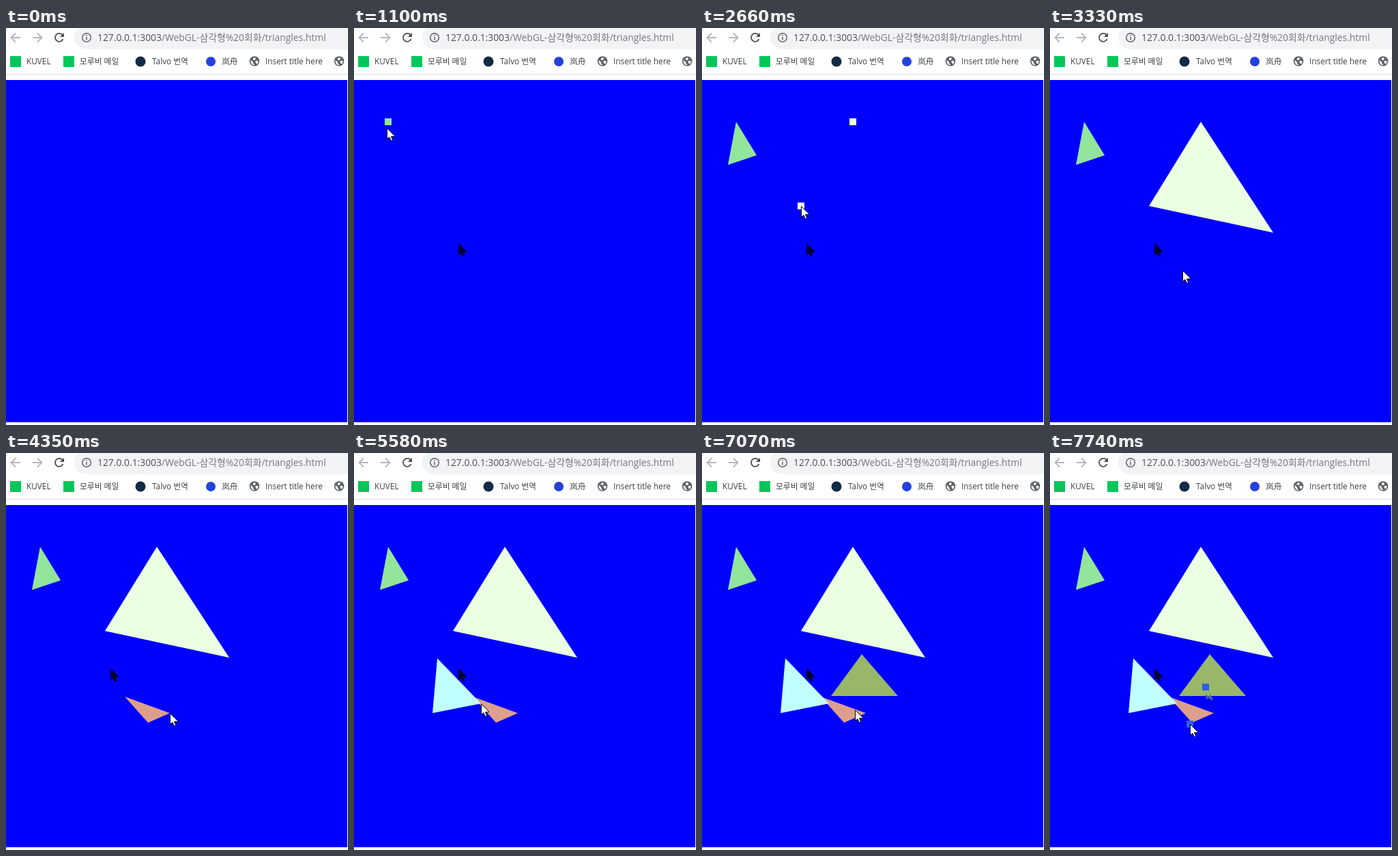
Recreate the animation shown at these times as an HTML page. Size 501 by 580 pixels, loop 8 s.

```html
<!DOCTYPE html>
<html lang="ko">
<head>
<meta charset="utf-8">
<title>Triangles</title>
<style>
  html, body { margin: 0; width: 100%; height: 100%; overflow: hidden; background: #fff; }
  svg { display: block; width: 501px; height: 580px; }
  text { font-family: "Open Sans", "Noto Sans CJK KR", "Noto Sans CJK SC", "Noto Sans CJK", sans-serif; }
  .url { font-size: 13.85px; fill: #757a80; }
  .url tspan { fill: #4d5156; }
  .marks { font-size: 11.8px; fill: #3c4043; }
  .line { fill: none; stroke-width: 1.8; }
</style>
</head>
<body>
<svg viewBox="0 0 501 580">
  <defs>
    <path id="arrow" d="M.5 .5V16.5L3.7 13.3 6.3 18.5H7.7L8.5 17.3 6.5 12.5H11.5V11.5Z"/>
    <g id="globe">
      <circle r="7.3" fill="#5f6368"/>
      <path d="M-5.6 -1.5L-2 1.2V3.4L-.4 4V6Q-5.6 5-5.6 -1.5ZM-2.6 -3.6L0 -5.5 2 -4.2 1.2 -2.2 -1 -1.2ZM1 .2L4 -1 5.7 .8 4.4 4 2.6 3.4Z" fill="#fff"/>
    </g>
  </defs>

  <rect width="501" height="580" fill="#fff"/>
  <rect x="100" y="-3" width="440" height="34" rx="17" fill="#f1f3f4"/>
  <g class="line" stroke="#b4b7c0">
    <path d="M21 14H8M14 7.5L7.5 14 14 20.5"/>
    <path d="M39 14H52M46 7.5L52.5 14 46 20.5"/>
  </g>
  <path class="line" stroke="#4a4d52" d="M82.6 10A6 6 0 1 0 83.6 16"/>
  <path fill="#4a4d52" d="M85 7V13H79Z"/>
  <g class="line" stroke="#5f6368" style="stroke-width:1.5">
    <circle cx="118" cy="14" r="6.3"/>
    <path d="M118 13V17.5M118 10V11.6"/>
  </g>
  <text class="url" x="134" y="19"><tspan>127.0.0.1:3003</tspan>/WebGL-삼각형%20회화/triangles.html</text>

  <rect x="6" y="41" width="16" height="16" fill="#03c75a"/>
  <rect x="84" y="41" width="16" height="16" fill="#03c75a"/>
  <circle cx="197" cy="49" r="7.5" fill="#0f2b46"/>
  <circle cx="300" cy="49" r="7" fill="#2342dc"/>
  <use href="#globe" x="364" y="48.5"/>
  <use href="#globe" x="488" y="48.5"/>
  <g class="marks">
    <text x="30" y="53">KUVEL</text>
    <text x="108" y="53">모루비 메일</text>
    <text x="214" y="53">Talvo 번역</text>
    <text x="316" y="53">岚舟</text>
    <text x="380" y="53">Insert title here</text>
  </g>
  <rect y="67" width="501" height="1" fill="#dadce0"/>

  <rect y="76" width="500" height="500" fill="#00f"/>
  <use id="ghost" href="#arrow" x="153" y="315" fill="#00002c" stroke="#00002c"/>
  <g id="scene">
    <polygon points="50,137 38,200 80,186" fill="#92e59b"/>
    <polygon points="221,137 145,260 327,299" fill="#ebffe3"/>
    <polygon points="174,356 208,394 240,380" fill="#dd9f8b"/>
    <polygon points="122,300 115,380 186,366" fill="#c1ffff"/>
    <polygon points="234,294 189,355 287,355" fill="#98b768"/>
    <polygon points="228,342 205,396" fill="#3060dc"/>
  </g>
  <path id="smudge" d="M228 352L232 356 235 353 239 360 236 361 233 358 229 360Z" fill="#416f9c"/>
  <g id="cursor">
    <circle id="ring" r="12" fill="#ff0" fill-opacity=".47"/>
    <use href="#arrow" fill="#fff" stroke="#000"/>
  </g>
</svg>
<script>
  const LOOP = 8000, STEP = 67, ENTER = 280;

  // A steady rhythm: three clicks per triangle, the last one held longer.
  const pressTime = (shape, corner) => 940 + 1255 * shape + 350 * corner;
  const holdTime = corner => corner === 2 ? 170 : 70;

  const $ = id => document.getElementById(id);
  const show = (el, on) => el.setAttribute('visibility', on ? 'visible' : 'hidden');
  const parts = [], presses = [];

  // Cursor stops between clicks.
  const path = [
    { t: ENTER, x: 153, y: 315 },
    { t: 430, x: 80, y: 195 },
    { t: 600, x: 80, y: 195 },
    { t: 1975, x: 263, y: 141 },
    { t: 3325, x: 194, y: 354 },
    { t: 4550, x: 240, y: 380 },
    { t: 6930, x: 220, y: 402 }
  ];

  function addPoint(triangle, { x, y }, from, to) {
    const el = document.createElementNS('http://www.w3.org/2000/svg', 'rect');
    const attrs = { x: x - 5, y: y - 5, width: 10, height: 10, fill: triangle.getAttribute('fill') };
    for (const k in attrs) el.setAttribute(k, attrs[k]);
    $('scene').append(el);
    parts.push({ el, from, to });
  }

  [...$('scene').children].forEach((triangle, shape) => {
    const corners = [...triangle.points];
    const done = corners.length === 3 ? pressTime(shape, 2) : LOOP;
    corners.forEach(({ x, y }, i) => {
      const from = pressTime(shape, i), to = from + holdTime(i);
      presses.push({ from, to });
      path.push({ t: from, x, y }, { t: to, x, y });
      if (from < done) addPoint(triangle, { x, y }, from, done);
    });
    parts.push({ el: triangle, from: done, to: LOOP });
  });
  path.sort((a, b) => a.t - b.t);

  parts.push(
    { el: $('ghost'), from: ENTER, to: LOOP },
    { el: $('cursor'), from: ENTER, to: LOOP },
    { el: $('smudge'), from: presses[presses.length - 2].to, to: LOOP }
  );

  function cursorAt(t) {
    const i = path.findIndex(p => p.t > t);
    if (i < 1) return i < 0 ? path[path.length - 1] : path[0];
    const a = path[i - 1], b = path[i];
    const k = Math.floor((t - a.t) / STEP) * STEP / (b.t - a.t);
    const e = k * k * (3 - 2 * k);
    return { x: Math.round(a.x + (b.x - a.x) * e), y: Math.round(a.y + (b.y - a.y) * e) };
  }

  const active = (span, t) => t >= span.from && t < span.to;

  function draw(t) {
    const { x, y } = cursorAt(t);
    for (const p of parts) show(p.el, active(p, t));
    $('cursor').setAttribute('transform', `translate(${x} ${y})`);
    $('ring').setAttribute('display', presses.some(p => active(p, t)) ? 'inline' : 'none');
  }

  const start = performance.now();
  function tick() {
    draw((performance.now() - start) % LOOP);
    requestAnimationFrame(tick);
  }
  tick();
</script>
</body>
</html>
```
